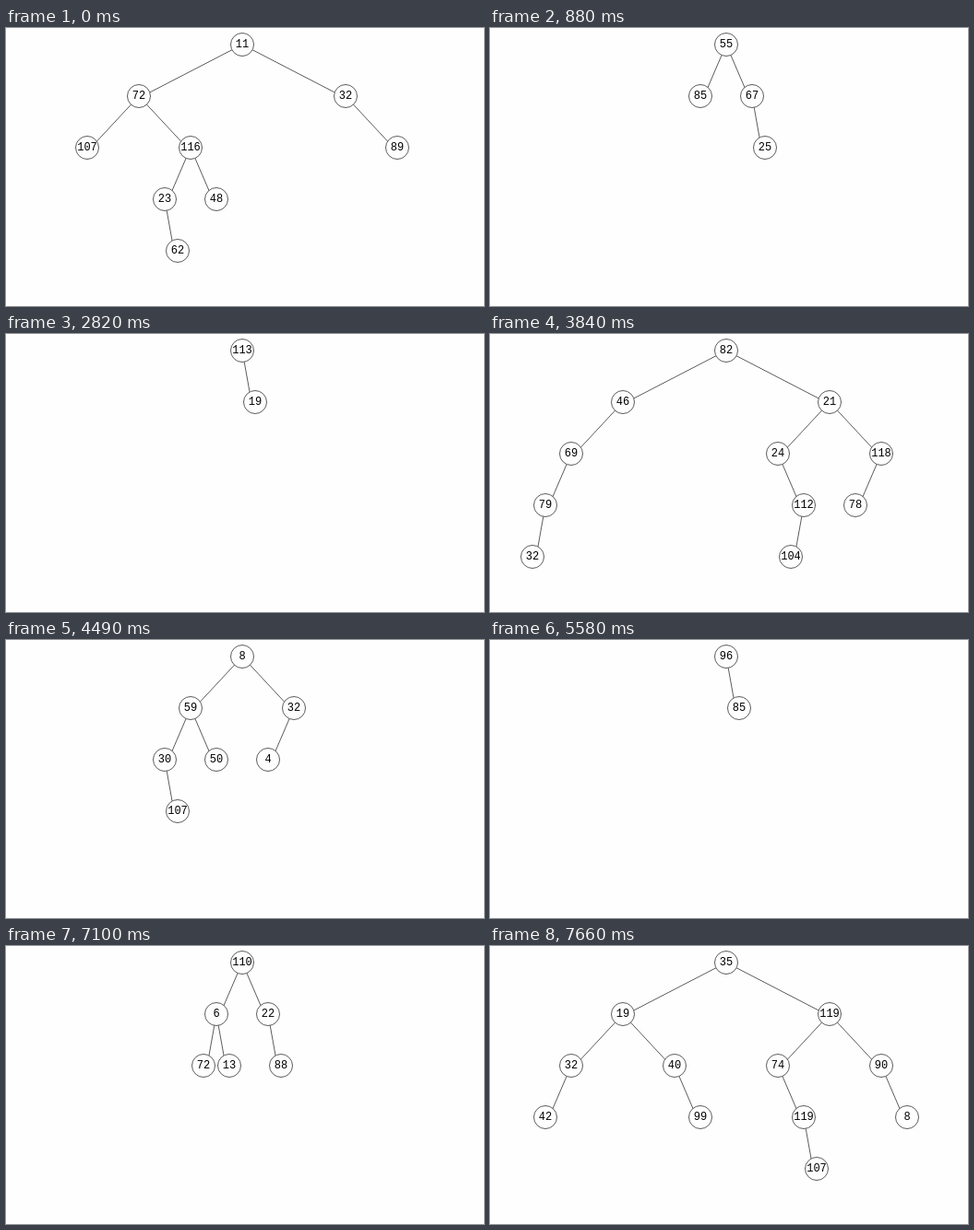
Write an HTML page that moves like this. It is 518 px wide and 302 px high and loops after 8460 ms.

```html
<!DOCTYPE html>
<html lang="en">
<head>
<meta charset="utf-8">
<title>Binary trees</title>
<style>
  html, body { margin: 0; width: 100%; height: 100%; overflow: hidden; background: #fefefe; }
  svg { display: block; width: 518px; height: 302px; }
  path, circle { stroke: #5c5c5c; }
  circle { fill: #fefefe; }
  text { font: 12px "Liberation Mono", "Courier New", monospace; text-anchor: middle; }
</style>
</head>
<body>
<svg id="stage" viewBox="0 0 518 302"></svg>
<script>
const LOOP = 8460;
const ROOT = { x: 256, y: 18 };
const LEVEL = 56, LEAF_SHIFT = 14, RADIUS = 12.5, EDGE_INSET = 4;
const MAX_LABEL = 119;

// Start time in ms, then the left/right path from the root to each leaf.
const scenes = [
  [0, "LL LRLR LRR RR"],
  [880, "L RR"],
  [1430, "R"],
  [1800, "R"],
  [2330, "LLL LR RL RRL"],
  [2820, "R"],
  [3250, "LLL LR RLLR RR"],
  [3840, "LLLL RLRL RRL"],
  [4490, "LLR LR RL"],
  [4990, ""],
  [5580, "R"],
  [6080, "LR RLL RR"],
  [6570, "LLL LRL RLL RRR"],
  [7100, "LL LR RR"],
  [7660, "LLL LRR RLRR RRR"]
];

const stage = document.getElementById("stage");

function seededRandom(seed) {
  let state = seed + 1;
  return () => (state = state * 48271 % 2147483647) / 2147483647;
}

// Every prefix of a leaf path is a node.
function nodePaths(leaves) {
  const paths = new Set();
  for (const leaf of leaves)
    for (let i = 0; i <= leaf.length; i++) paths.add(leaf.slice(0, i));
  return [...paths];
}

function draw(leafText, seed) {
  const leaves = leafText.split(" ");
  const depth = Math.max(...leaves.map(leaf => leaf.length));
  const random = seededRandom(seed * 7919);
  random();

  const side = (path, i) => path[i] === "L" ? -1 : 1;
  const position = path => {
    let x = ROOT.x;
    for (let i = 0; i < path.length; i++)
      x += side(path, i) * LEAF_SHIFT * 2 ** (depth - 1 - i);
    return { x, y: ROOT.y + path.length * LEVEL };
  };

  let edges = "", nodes = "";
  for (const path of nodePaths(leaves)) {
    const { x, y } = position(path);
    if (path) {
      const parent = position(path.slice(0, -1));
      const endX = x - side(path, path.length - 1) * EDGE_INSET;
      edges += `M${parent.x} ${parent.y}L${endX} ${y}`;
    }
    const label = 1 + Math.floor(random() * MAX_LABEL);
    nodes += `<circle cx="${x}" cy="${y}" r="${RADIUS}"/>` +
             `<text x="${x}" y="${y + 3}">${label}</text>`;
  }
  stage.innerHTML = `<path d="${edges}"/>${nodes}`;
}

const start = performance.now();
let shown = -1;

function update() {
  const time = (performance.now() - start) % LOOP;
  const current = scenes.filter(([from]) => from <= time).length - 1;
  if (current !== shown) {
    draw(scenes[current][1], current);
    shown = current;
  }
  requestAnimationFrame(update);
}
update();
</script>
</body>
</html>
```
